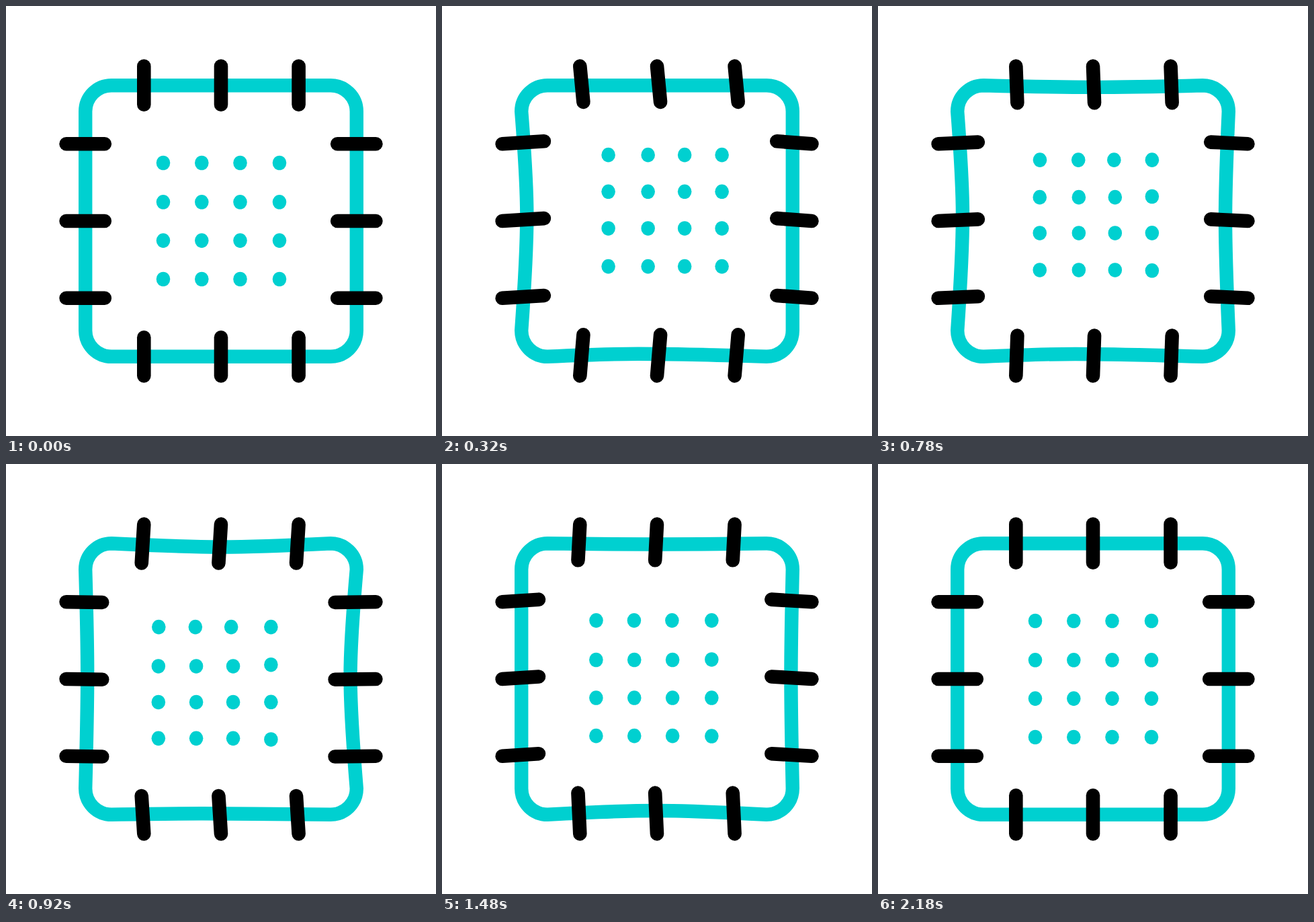
Recreate the animation shown at these times as an HTML page. Size 640 px wide and 640 px high, loop 2.4 s.

```html
<!DOCTYPE html>
<html lang="en">
<head>
<meta charset="utf-8">
<title>Stitched patch</title>
<style>
  html, body { margin: 0; width: 100%; height: 100%; overflow: hidden; background: #fff; }
  svg { display: block; width: 100%; height: 100%; }
</style>
</head>
<body>
<svg viewBox="0 0 640 640">
  <path id="border" fill="none" stroke="#00d0d0" stroke-width="20.4"/>
  <g id="dots" fill="#00d0d0"></g>
  <g id="pins" stroke="#000" stroke-width="20.6" stroke-linecap="round"></g>
</svg>
<script>
const LOOP = 2400, STEP = 20, SEGMENT = 545;
const NEAR = 118.2, FAR = 521.8, START = 157, END = 483;

const border = document.getElementById('border');

function add(parent, tag, attrs) {
  const el = document.createElementNS('http://www.w3.org/2000/svg', tag);
  set(el, attrs);
  document.getElementById(parent).appendChild(el);
  return el;
}
function set(el, attrs) {
  for (const key in attrs) el.setAttribute(key, attrs[key]);
}

// Every pose list runs: rest, up-right, down-left, up, rest.
function pose(keys, t) {
  const i = Math.min(3, Math.floor(t / SEGMENT));
  const u = Math.min(1, t / SEGMENT - i);
  return keys[i] + (keys[i + 1] - keys[i]) * u * u * (3 - 2 * u);
}

// Pins: the outer end stays, the inner end is pulled.
const pullX = [0, 8.1, -7.1, -1.8, 0];
const pullY = [0, -6.15, 2.8, -5.1, 0];
const pins = [];
function addPin(x1, y1, x2, y2) {
  pins.push({ x: x2, y: y2, el: add('pins', 'line', { x1, y1, x2, y2 }) });
}
for (const p of [205.3, 320, 435.6]) {
  addPin(p, 89.6, p, 146.8);
  addPin(p, 550.4, p, 493.2);
}
for (const p of [205.2, 320, 434.8]) {
  addPin(89.6, p, 146.8, p);
  addPin(550.4, p, 493.2, p);
}

// Dots: columns and rows are pulled by different amounts.
const colX = [234, 291.3, 348.5, 407], rowY = [233.5, 291.8, 349.1, 406.5];
const upX = [21.6, 24.4, 20.1, 15.3], upY = [-18.8, -24.6, -28.8, -30];
const downX = [-15.8, -18, -19.6, -21], downTopX = [-15.2, -19.6, -23.4, -21];
const downY = [17.5, 19.3, 15.6, 11.4], downLastY = [17.5, 16.4, 15.4, 13.5];
const dots = [];
rowY.forEach((y, r) => colX.forEach((x, c) => dots.push({
  x, y,
  dx: [0, upX[c], (r ? downX : downTopX)[c], -1.9, 0],
  dy: [0, upY[r], (c < 3 ? downY : downLastY)[r], -5.1, 0],
  el: add('dots', 'ellipse', { rx: 10.3, ry: 10.8 })
})));

// Border: each side bends at one smooth middle point.
const bend = {
  top: [0, 0, 6.8, 0, 0],
  right: [0, 0, -12, 0, 0],
  bottom: [0, -6.4, 0, -7.3, 0],
  left: [0, 12.9, 0, 0, 0]
};
const bottomMid = [285, 296, 290, 325, 328];

function side(from, to, mid, base, offset, vertical) {
  const point = (along, across) => vertical ? `${across} ${along}` : `${along} ${across}`;
  const b = base + offset, a = point(from, base), z = point(to, base);
  const h1 = mid - (mid - from) / 3, h2 = mid + (to - mid) / 3;
  return `C${a} ${point(h1, b)} ${point(mid, b)} C${point(h2, b)} ${z} ${z}`;
}
function corner(x, y) {
  return `A38.8 38.8 0 0 1 ${x} ${y}`;
}

function draw(t) {
  const px = pose(pullX, t), py = pose(pullY, t);
  for (const p of pins) set(p.el, { x2: p.x + px, y2: p.y + py });
  for (const d of dots) set(d.el, { cx: d.x + pose(d.dx, t), cy: d.y + pose(d.dy, t) });
  set(border, { d: [
    `M${START} ${NEAR}`,
    side(START, END, 320, NEAR, pose(bend.top, t), false),
    corner(FAR, START),
    side(START, END, 316, FAR, pose(bend.right, t), true),
    corner(END, FAR),
    side(END, START, pose(bottomMid, t), FAR, pose(bend.bottom, t), false),
    corner(NEAR, END),
    side(END, START, 312, NEAR, pose(bend.left, t), true),
    corner(START, NEAR),
    'Z'
  ].join(' ') });
}

function tick() {
  draw(Math.floor(performance.now() % LOOP / STEP) * STEP);
  requestAnimationFrame(tick);
}
tick();
</script>
</body>
</html>
```
